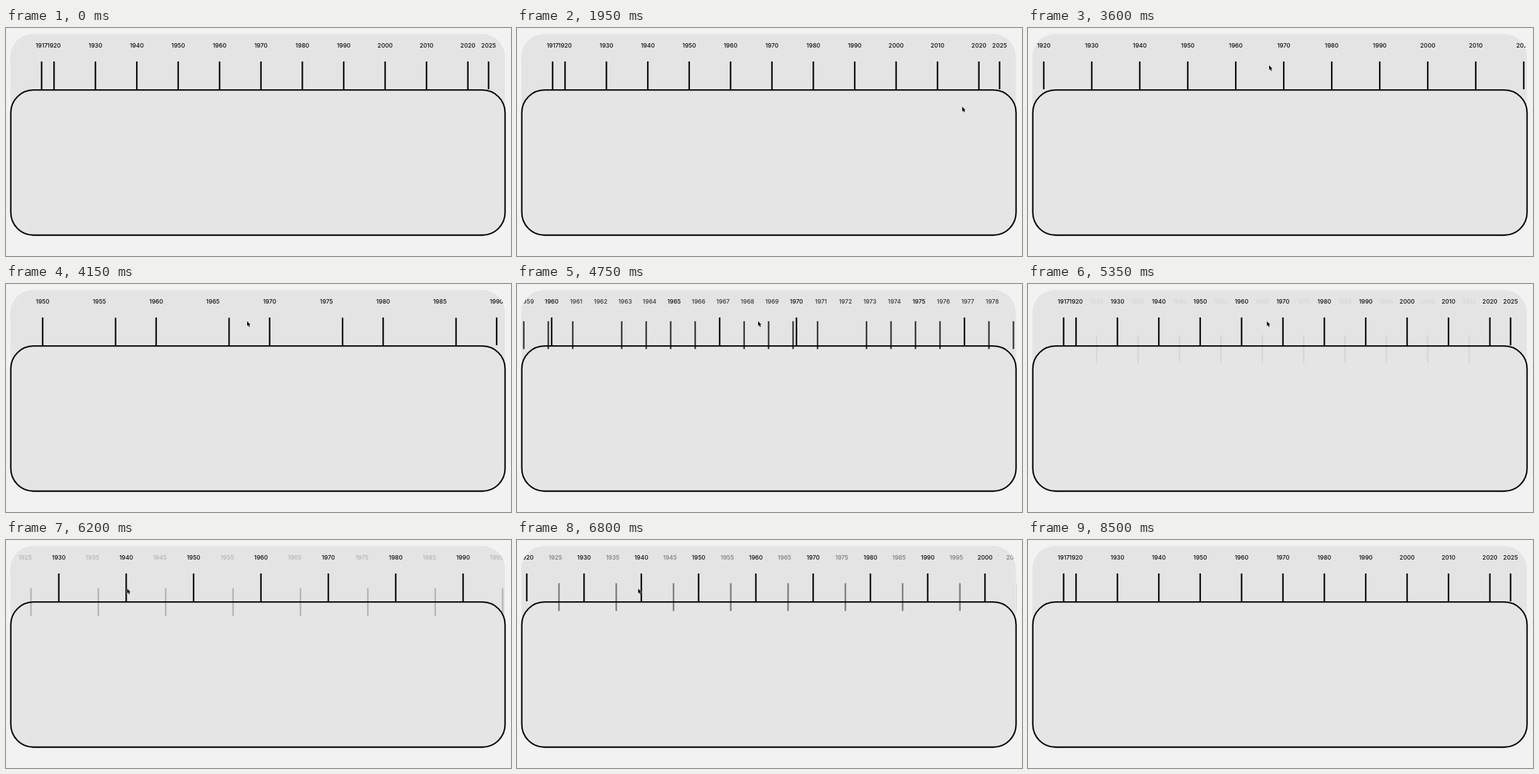
An HTML page with a canvas that plays this animation: 800 by 361 pixels, repeating every 9550 ms.

```html
<!DOCTYPE html>
<html lang="en">
<head>
<meta charset="utf-8">
<title>Zoomable timeline</title>
<style>
  html, body { margin: 0; width: 100%; height: 100%; overflow: hidden; background: #f2f2f2; }
  canvas { display: block; width: 800px; height: 361px; }
</style>
</head>
<body>
<canvas id="stage"></canvas>
<script>
const W = 800, H = 361, LOOP = 9550, STEP = 50;
const INK = '#0b0b0b';
const FADE = 600, SLIDE = 30;
const FIRST = 1917, LAST = 2025;

// Each gesture zooms in until peak and back out until end; top is log2 of the scale.
const GESTURES = [
  { start: 3540, peak: 4750, end: 5200, top: 2.5645, anchor: 396, fives: [3650, 4940], ones: [4450, 4750] },
  { start: 5960, peak: 6450, end: 6950, top: 1.269, anchor: 234, fives: [6100, 6620] }
];

const POINTER = { x: 768, y: 150, show: 1600, hide: 7650 };
const MOVES = [
  { from: 1600, to: 1650, x: 752, y: 134 },
  { from: 1850, to: 2300, x: 382, y: 59 },
  { from: 5150, to: 5300, x: 378.5, y: 59 },
  { from: 5400, to: 5650, x: 192, y: 77 },
  { from: 7400, to: 7650, x: 235, y: 322 }
];

const canvas = document.getElementById('stage');
const ctx = canvas.getContext('2d');
const dpr = window.devicePixelRatio || 1;
canvas.width = W * dpr;
canvas.height = H * dpr;
ctx.scale(dpr, dpr);

const clamp = v => Math.min(1, Math.max(0, v));
const part = (t, from, to) => clamp((t - from) / (to - from));
const smooth = u => u * u * (3 - 2 * u);

// cubic-bezier(.25, .1, .25, 1)
function ease(x) {
  let lo = 0, hi = 1, u = x;
  for (let i = 0; i < 24; i++) {
    u = (lo + hi) / 2;
    if (.75 * u * (1 - u) + u ** 3 < x) lo = u; else hi = u;
  }
  return .3 * u * (1 - u) ** 2 + 3 * u * u * (1 - u) + u ** 3;
}

function fade(t, span) {
  if (!span) return 0;
  const [on, off] = span.map(at => ease(part(t, at, at + FADE)));
  return clamp(on - off);
}

function scaleAt(t, g) {
  const u = Math.min(part(t, g.start, g.peak), part(t, g.end, g.peak));
  return 2 ** (g.top * u ** .827);
}

function pointerAt(t) {
  let { x, y } = POINTER;
  for (const m of MOVES) {
    const u = smooth(part(t, m.from, m.to));
    x += (m.x - x) * u;
    y += (m.y - y) * u;
  }
  return [x, y];
}

function roundRect(x, y, w, h) {
  ctx.beginPath();
  ctx.roundRect(x, y, w, h, 36);
}

function drawYear(year, x, tickX, alpha) {
  ctx.globalAlpha = alpha;
  if (x > 7 && x < 791) ctx.fillText(year, x, 31.1);
  ctx.fillRect(tickX - 1.2, 53 + SLIDE * (1 - alpha), 2.4, 44);
  ctx.globalAlpha = 1;
}

function drawPointer(x, y) {
  ctx.save();
  ctx.translate(x, y);
  ctx.beginPath();
  [[0, 0], [0, 7.6], [1.7, 6.1], [2.9, 9], [4.2, 8.4], [3, 5.7], [5.2, 5.6]]
    .forEach(p => ctx.lineTo(...p));
  ctx.closePath();
  ctx.lineWidth = 1;
  ctx.strokeStyle = '#f4f4f4';
  ctx.stroke();
  ctx.fillStyle = '#000';
  ctx.fill();
  ctx.restore();
}

function drawPanels() {
  ctx.fillStyle = '#f2f2f2';
  ctx.fillRect(0, 0, W, H);
  ctx.fillStyle = '#e4e4e4';
  roundRect(7, 9.5, 783.3, 318.5);
  ctx.fill();
  roundRect(7.6, 98.2, 783, 229.8);
  ctx.fillStyle = '#e5e5e5';
  ctx.fill();
  ctx.lineWidth = 2.3;
  ctx.strokeStyle = INK;
  ctx.stroke();
}

function drawScale(t) {
  const g = GESTURES[t < GESTURES[1].start ? 0 : 1];
  const k = scaleAt(t, g);
  const toX = year => g.anchor + k * (76.1 + 6.556 * (year - 1920) - g.anchor);
  const drift = 14.69 * (k - 1);
  const fives = fade(t, g.fives), ones = fade(t, g.ones);

  ctx.save();
  roundRect(7, 9.5, 784.3, 318.5);
  ctx.clip();
  ctx.fillStyle = INK;
  ctx.font = '500 9.4px Inter, "Liberation Sans", sans-serif';
  ctx.textAlign = 'center';
  for (let year = FIRST; year <= LAST; year++) {
    const x = toX(year);
    const major = year % 10 === 0 || year === FIRST || year === LAST;
    const alpha = major ? 1 : year % 5 ? ones : fives;
    if (alpha > .005) drawYear(year, x, major ? x : x + drift, alpha);
  }
  ctx.restore();
}

function draw(t) {
  drawPanels();
  drawScale(t);
  if (t >= POINTER.show && t < POINTER.hide) drawPointer(...pointerAt(t));
}

function tick() {
  const t = performance.now() % LOOP;
  draw(Math.floor(t / STEP) * STEP);
  requestAnimationFrame(tick);
}
tick();
</script>
</body>
</html>
```
